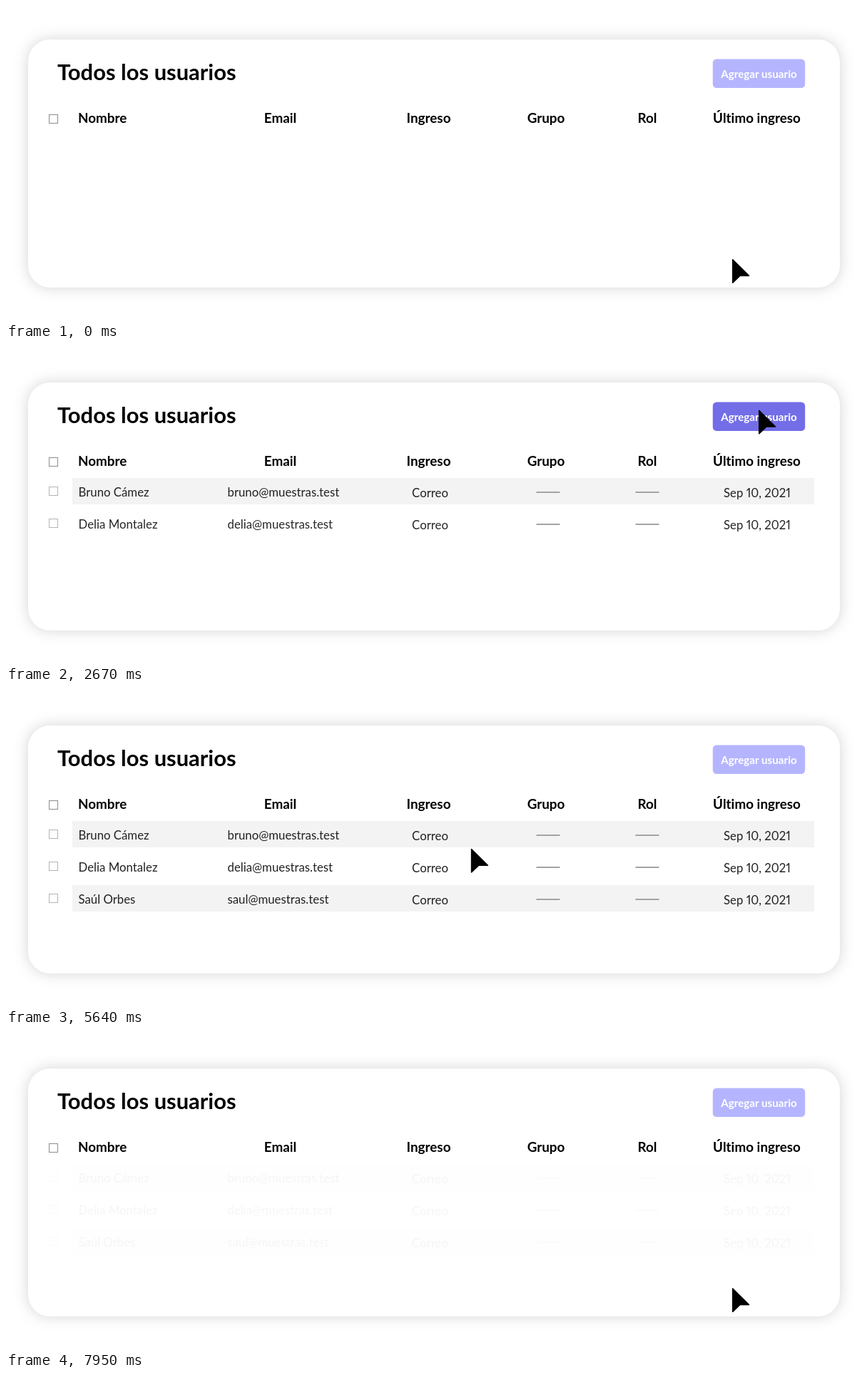
An HTML page that plays this animation: 1200x442 px, repeating every 8.37 s.

```html
<!DOCTYPE html>
<html lang="es">
<head>
<meta charset="utf-8">
<style>
  html, body { margin: 0; width: 100%; height: 100%; overflow: hidden; background: #fff; }
  svg {
    display: block; width: 1200px; height: 442px; fill: #222;
    font: 16.8px Lato, sans-serif; font-variant: no-common-ligatures proportional-nums;
  }
  .card { fill: #fff; filter: drop-shadow(0 0 10px rgba(0, 0, 0, .17)); }
  .title { font-size: 30.95px; font-weight: 700; fill: #000; }
  .head { font-size: 18.85px; font-weight: 700; fill: #000; }
  .label { font-size: 15.2px; font-weight: 700; fill: #fff; }
  .mid { text-anchor: middle; }
  .box { fill: #fff; stroke: #8c8c8c; }
  .row .box { stroke: #b4b4b4; }
  .dash { stroke: #a3a3a3; stroke-width: 2; }
</style>
</head>
<body>
<svg viewBox="0 0 1200 442">
  <rect class="card" x="31" y="47" width="1138" height="348" rx="31"/>
  <text class="title" x="72" y="104">Todos los usuarios</text>
  <rect id="button" x="990.8" y="74.5" width="129.4" height="40.5" rx="5.5"/>
  <text class="label mid" x="1055.5" y="101">Agregar usuario</text>
  <g id="table"></g>
  <path id="cursor" d="M.7 .7V33.4L11 23.5H23.6Z" fill="#000" stroke="#000" stroke-width="1.4" stroke-linejoin="round"/>
</svg>
<script>
const LOOP = 8370, LAST_CHANGE = 7950;
const $ = id => document.getElementById(id);

const text = (cls, x, y, s) => `<text class="${cls}" x="${x}" y="${y}">${s}</text>`;
const checkbox = y => `<rect class="box" x="60.5" y="${y}" width="12" height="12"/>`;
const dash = (x, y) => `<path class="dash" d="M${x} ${y}h33"/>`;

const heads = [[384.5, 'Email'], [592.5, 'Ingreso'], [757, 'Grupo'], [899, 'Rol'], [1052.5, 'Último ingreso']];
const users = [
  { name: 'Bruno Cámez', mail: 'bruno@muestras.test', start: 1700 },
  { name: 'Delia Montalez', mail: 'delia@muestras.test', start: 2200 },
  { name: 'Saúl Orbes', mail: 'saul@muestras.test', start: 2690 },
];

const userRow = ({ name, mail }, i) => {
  const y = 181 + 45 * i;
  const band = i % 2 ? '' : `<rect x="93" y="${y}" width="1040" height="37" fill="#f3f3f3"/>`;
  return `<g class="row">${band}${checkbox(y + 12.5)}` +
    text('', 101.5, y + 25.5, name) + text('', 310.5, y + 25.5, mail) +
    text('mid', 594.5, y + 26.5, 'Correo') + dash(743.5, y + 20) + dash(882.5, y + 20) +
    text('mid', 1053, y + 26.5, 'Sep 10, 2021') + '</g>';
};

$('table').innerHTML = checkbox(152.5) + text('head', 101, 163.5, 'Nombre') +
  heads.map(([x, s]) => text('head mid', x, 163.5, s)).join('') + users.map(userRow).join('');
const rows = document.querySelectorAll('.row');

// Cursor path: time, x, y
const path = [
  [0, 1018, 355], [840, 1041, 161], [1250, 1055, 85.5], [3390, 1055, 85.5],
  [4200, 971, 102], [4500, 901, 119], [5040, 779, 157.5], [5640, 652, 219.5],
  [5760, 631, 245], [5880, 637, 271], [6390, 767.5, 333.5], [6720, 861, 355],
  [7050, 955, 368], [7380, 1018, 355],
];

const slope = (i, axis) => (path[i + 1][axis] - path[i][axis]) / (path[i + 1][0] - path[i][0]);

// Speed at a path point: zero at ends, rests and turning points
function tangent(i, axis) {
  if (i === 0 || i === path.length - 1) return 0;
  const a = slope(i - 1, axis), b = slope(i, axis);
  if (a * b <= 0) return 0;
  const before = path[i][0] - path[i - 1][0], after = path[i + 1][0] - path[i][0];
  return (a * after + b * before) / (before + after);
}

function position(t, axis) {
  const end = path.findIndex(p => p[0] > t);
  if (end < 0) return path[path.length - 1][axis];
  const i = end - 1, span = path[end][0] - path[i][0], u = (t - path[i][0]) / span, v = 1 - u;
  return path[i][axis] * v * v * (1 + 2 * u) + path[end][axis] * u * u * (1 + 2 * v) +
    span * u * v * (tangent(i, axis) * v - tangent(end, axis) * u);
}

const ramp = (t, from, to) => Math.min(1, Math.max(0, (t - from) / (to - from)));

function draw(now) {
  const t = Math.min(now % LOOP, LAST_CHANGE);
  const hover = ramp(t, 1000, 1350) - ramp(t, 3950, 4300);
  const mix = (a, b) => a + (b - a) * hover;
  $('button').setAttribute('fill', `rgb(${mix(181, 115)},${mix(181, 110)},${mix(255, 232)})`);
  users.forEach(({ start }, i) => {
    rows[i].setAttribute('opacity', ramp(t, start, start + 480) * (1 - ramp(t, 6750, 8000)));
  });
  $('cursor').setAttribute('transform', `translate(${position(t, 1)} ${position(t, 2)})`);
}

const began = performance.now();
(function tick() {
  draw(performance.now() - began);
  requestAnimationFrame(tick);
})();
</script>
</body>
</html>
```
